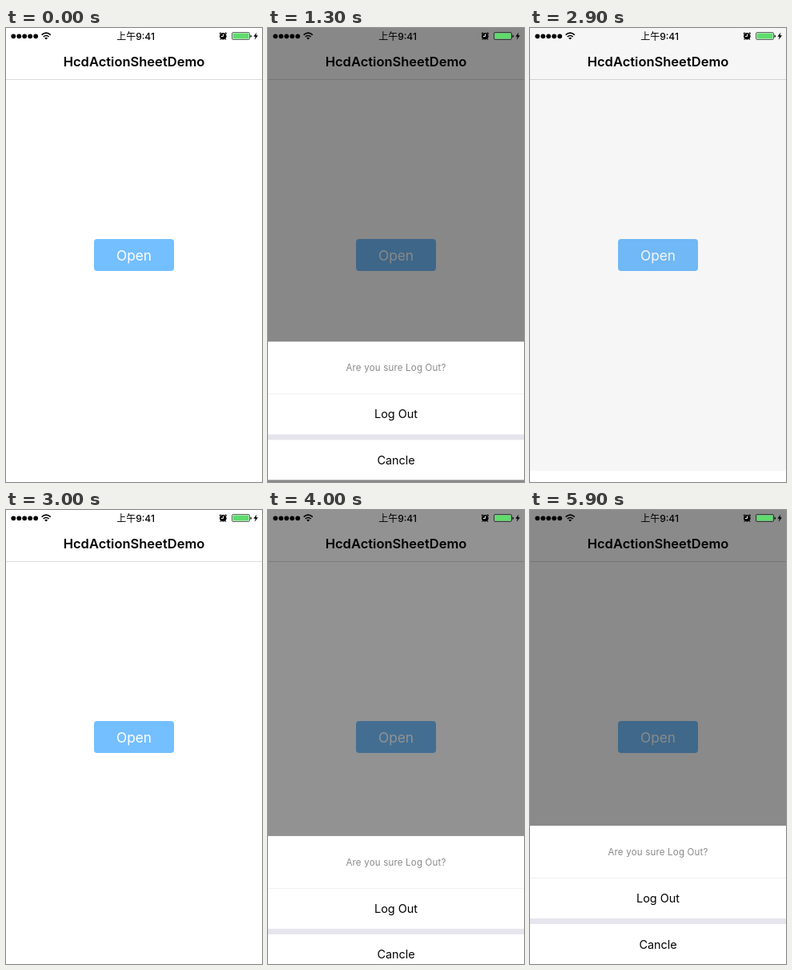
These frames come from a looping animation (320x568 px, 6 s). An HTML page:

```html
<!DOCTYPE html>
<html lang="en">
<head>
<meta charset="utf-8">
<title>Action sheet</title>
<style>
  html, body { margin: 0; width: 100%; height: 100%; overflow: hidden; background: #fff; }
  svg { display: block; width: 320px; height: 568px; }
  text { font-family: Inter, "Noto Sans CJK SC", "Noto Sans CJK", sans-serif; text-anchor: middle; }
  .title { font-size: 16.5px; font-weight: 600; }
  .open { font-size: 17.3px; fill: #fff; }
  .item { font-size: 14.4px; }
  .hint { font-size: 11.5px; letter-spacing: .2px; fill: #888; }
  .clock { font-size: 12px; font-weight: 500; }
</style>
</head>
<body>
<svg viewBox="0 0 320 568">
  <rect width="320" height="568" fill="#fff"/>
  <rect y="64" width="320" height="1" fill="#dadada"/>
  <text class="title" x="160" y="48">HcdActionSheetDemo</text>
  <rect x="110" y="264" width="100" height="40" rx="4" fill="#74bfff"/>
  <text class="open" x="160" y="290.5">Open</text>

  <rect id="shade" width="320" height="568" opacity="0"/>

  <g id="sheet" transform="translate(0 568)">
    <rect width="320" height="173" fill="#fff"/>
    <rect y="65" width="320" height="1" fill="#f0f0f2"/>
    <rect y="116" width="320" height="7" fill="#e6e5ee"/>
    <text class="hint" x="160" y="37">Are you sure Log Out?</text>
    <text class="item" id="logout" x="160" y="96">Log Out</text>
    <text class="item" x="160" y="153.5">Cancle</text>
  </g>

  <g id="status">
    <circle cx="9.3" cy="10.3" r="2.9"/>
    <circle cx="16.3" cy="10.3" r="2.9"/>
    <circle cx="23.2" cy="10.3" r="2.9"/>
    <circle cx="30.2" cy="10.3" r="2.9"/>
    <circle cx="37.2" cy="10.3" r="2.9"/>
    <g fill="none" stroke="#000" stroke-width="1.6">
      <path d="M44.6 8.6Q50.2 3.8 55.8 8.6"/>
      <path d="M46.7 11Q50.2 8 53.7 11"/>
    </g>
    <path d="M48.2 12.4Q50.2 10.9 52.2 12.4L50.2 14.5Z"/>
    <text class="clock" x="162" y="14.6">上午9:41</text>
    <circle cx="271.3" cy="10.2" r="4.3"/>
    <path d="M266.9 7.2L268.6 5.6M275.7 7.2L274 5.6M268.5 13.6L267.6 14.6M274.1 13.6L275 14.6" stroke="#000" stroke-width="1.2"/>
    <path d="M271.5 7.5V10.5H269" fill="none" stroke="#fff" stroke-width="1"/>
    <rect x="282.5" y="5.5" width="22" height="9" rx="1.5" fill="none" stroke="#000" stroke-opacity=".6"/>
    <rect x="283.5" y="6.5" width="20" height="7" rx=".6" fill="#5fdc6c"/>
    <path d="M305.5 8.5A1.8 1.8 0 0 1 305.5 12Z"/>
    <path d="M313.4 5.5L309.4 10.8H311.8L310.8 14.8L315 9.2H312.5Z"/>
  </g>
</svg>
<script>
  const LOOP = 6000, STEP = 100, HEIGHT = 568, SHEET = 173, DIM = 0.46;
  const $ = id => document.getElementById(id);
  const shade = $("shade"), sheet = $("sheet"), logout = $("logout");

  // Underdamped spring, damping ratio 0.8
  function spring(ms) {
    if (ms <= 0) return 0;
    const u = ms * 0.0266;
    return 1 - Math.exp(-0.8 * u) * (Math.cos(0.6 * u) + 4 / 3 * Math.sin(0.6 * u));
  }

  function ease(x) {
    x = Math.min(1, Math.max(0, x));
    return x < 0.5 ? 2 * x * x : 1 - 2 * (1 - x) ** 2;
  }

  function openness(t) {
    if (t >= 3800) return spring(t - 3881);
    if (t >= 2800) return 1 - ease((t - 2800) / 125);
    return spring(t - 1103);
  }

  function draw(t) {
    const p = openness(t);
    const pressed = t >= 2600 && t < 3000;
    shade.setAttribute("opacity", DIM * p);
    sheet.setAttribute("transform", `translate(0 ${HEIGHT - SHEET * p})`);
    logout.setAttribute("opacity", pressed ? 0.2 : 1);
  }

  const start = performance.now();
  function tick() {
    const t = (performance.now() - start) % LOOP;
    draw(Math.floor(t / STEP) * STEP);
    requestAnimationFrame(tick);
  }
  tick();
</script>
</body>
</html>
```
